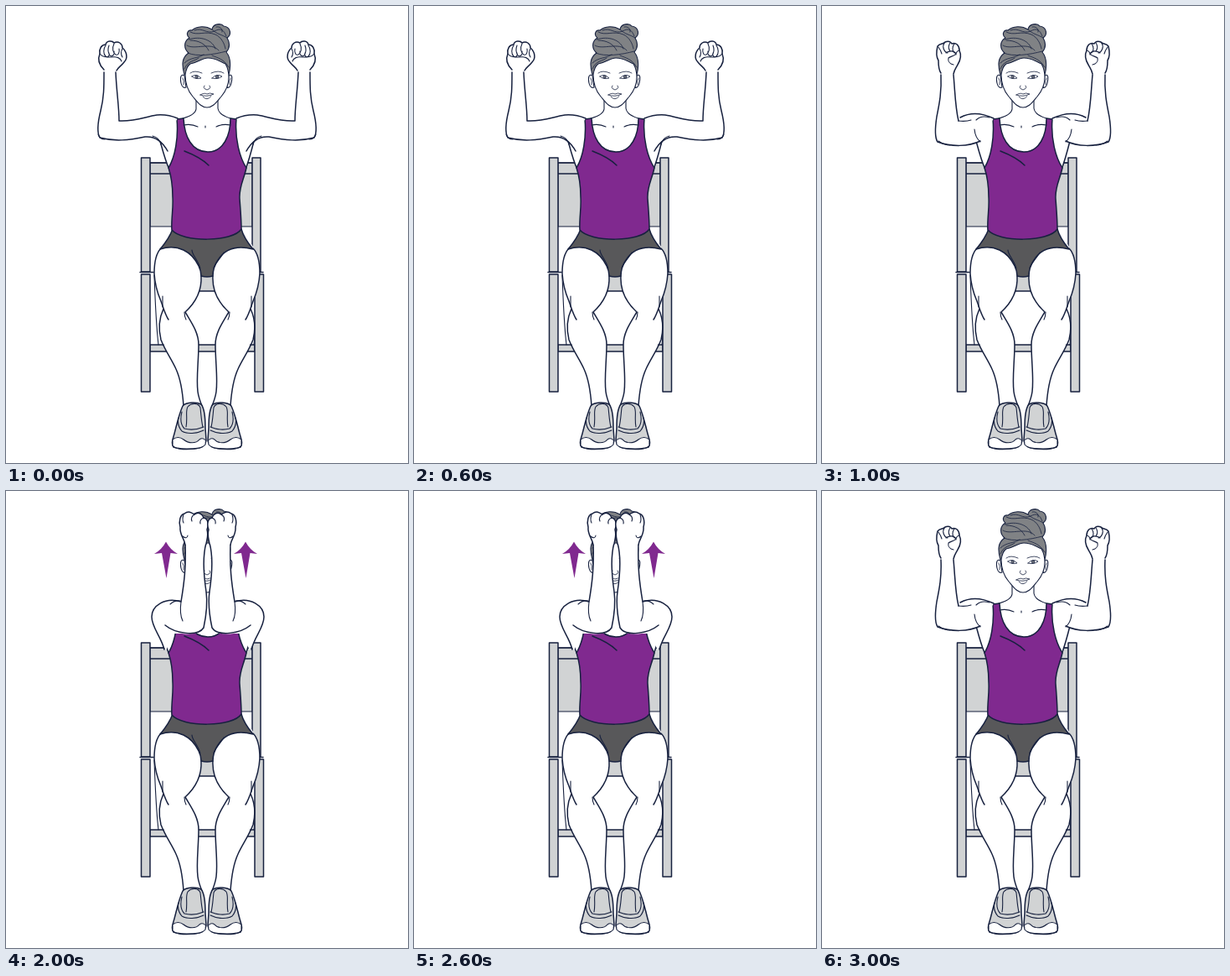
Recreate the animation shown at these times as an HTML page. Size 480 by 545 pixels, loop 4000 ms.

```html
<!DOCTYPE html>
<html lang="en">
<head>
<meta charset="utf-8">
<title>Seated arm exercise</title>
<style>
html, body { margin: 0; width: 100%; height: 100%; overflow: hidden; background: #fff; }
svg { display: block; width: 100vw; height: 100vh; }
path { stroke: #17213f; stroke-width: 1.5; stroke-linecap: round; stroke-linejoin: round; fill: none; }
.skin { fill: #fff; }
.bare { fill: #fff; stroke: none; }
.gray { fill: #d1d3d4; }
.hair { fill: #808285; }
.shorts { fill: #58585a; }
.top { fill: #80298f; }
.arrow { fill: #80298f; stroke: none; }
.fine { stroke-width: .8; }
.mid { stroke-width: 1.1; }
.pose { display: none; }
</style>
</head>
<body>
<svg viewBox="0 0 480 545">
  <!-- chair -->
  <g>
    <path class="gray mid" d="M172 187H294V263H172Z"/>
    <path d="M172 187H294M172 200H294"/>
    <path class="gray" d="M161.500 181H172V317H161.500ZM294 181H304V317H294Z"/>
    <path class="gray" d="M172 404H297V412H172Z"/>
    <path class="mid" d="M177 321C178 350 179 378 182 404M301 321C301 350 299 378 296 404"/>
    <path class="gray" d="M161.500 320H172V460H161.500ZM297 320H307.500V460H297Z"/>
    <path class="gray" d="M225 318H255V340H225Z"/>
    <path d="M160 317.500H176M302 317.500H307"/>
  </g>

  <!-- legs and shoes -->
  <g id="leg">
    <path class="bare" d="M198 270C187 282 178 294 177 317C177 336 182 345 187 358C180 380 184 398 199 426C208 442 211 460 212 480H235C227 455 231 430 230 405C230 390 221 378 214 365C226 354 234 340 233 322L240 275Z"/>
    <path d="M185 289C178 296 177 308 177 319C178 336 182 345 185 352C188 360 190 368 194 374M188 361C183 372 182 386 185 398C190 411 198 422 203 433C209 446 211 462 212 477M233 322C234 340 226 354 214 365C221 377 230 389 230 404C230 424 227 444 229 460C230 467 232 472 234 477"/>
    <path class="mid" d="M187 346V359M213 365Q213 370 215 374"/>
    <path class="gray" d="M211 477C215 472 228 472 233 475C237 480 238 491 238 503L239 518C238 525 233 527 225 528C215 529 205 528 200 526C197 522 199 517 201 510C204 499 206 488 211 477Z"/>
    <path class="skin mid" d="M199 517C204 513 208 514 212 517C218 522 227 522 231 517Q235 514 238.500 518L238 523C234 528 224 528 216 528C207 528 200 527 199 524Z"/>
    <path class="mid" d="M215 502C217 491 214 483 217 478C221 473 230 473 232 479C233 487 233 494 235 502M210 484C208 492 208 499 213 504Q224 507 236 502M210 507C216 511 228 510 236 506M206 491Q204 500 210 507"/>
  </g>
  <use href="#leg" transform="matrix(-1 0 0 1 480 0)"/>

  <!-- torso -->
  <path class="bare" d="M226 105L225 128L208 134L186 165L194 196H286L294 165L272 134L254 128L253 105Z"/>
  <path d="M184 161C187 172 190 184 195 195M296 161C293 173 290 184 286 195"/>
  <path class="shorts" d="M199 266C195 277 189 284 184 290C205 283 222 293 230 310Q233 316 233 322Q240 324 247 322Q247 312 253 303C263 287 279 286 295 290C290 284 284 277 281 266Z"/>
  <path class="mid" d="M232 313C229 302 222 297 222 291M248 312C252 303 258 299 260 294"/>
  <path class="top" d="M204 135L212 134C213 156 222 174 241 174C260 174 268 154 268 134L275 135C273 158 279 181 287 193C284 207 278 216 279 230C280 243 281 255 281 266C271 282 210 282 198 267C197 255 200 241 199 228C199 215 198 205 194 193C202 180 206 157 204 135Z"/>
  <path d="M213 173C226 178 234 182 242 190"/>

  <!-- neck and head -->
  <path class="mid" d="M227 109V123Q226 130 211 134M253 109V122Q254 130 268 134M212 142Q221 140 229 144M268 142Q259 140 251 144M238 143V145"/>
  <path class="skin mid" d="M213 83C208 80 208 87 209 92C210 97 213 98 215 97ZM266 83C271 80 270 87 269 92C268 97 265 98 264 97Z"/>
  <path class="hair mid" d="M213 82C209 68 211 61 218 56C212 51 212 42 219 38C214 34 217 28 222 29C228 24 238 23 246 28C247 21 257 20 260 24C268 25 270 34 264 38C267 43 268 49 263 55C269 62 268 74 266 82Z"/>
  <path class="skin mid" d="M214 82C215 75 217 71 220 69C230 67 234 62 241 62C251 62 257 67 262 69C265 74 266 79 266 85C266 95 262 102 257 108C251 115 247 121 240 121C233 121 229 115 223 108C217 101 214 94 214 82Z"/>
  <path class="fine" d="M217 56C228 61 248 58 263 54M216 47C225 53 245 42 254 53M218 40C233 35 247 41 250 51M220 31C229 36 238 29 250 34C257 37 261 45 262 51M225 29C235 25 239 34 249 30C256 26 260 28 263 36M246 28C252 34 258 34 264 38M251 25C255 24 259 27 258 31M213 68C220 61 228 63 236 58M213 75C217 65 225 66 230 62M266 73C260 63 253 62 246 59M220 41C230 41 238 45 242 53"/>
  <path class="fine" d="M211 86Q213 89 212 94M268 86Q266 89 267 94M220 80Q225 76 234 80M245 80Q254 76 260 80M237 95Q235 98 238 99Q240 101 242 99Q245 98 243 95"/>
  <path class="fine" d="M222 84Q227 80 233 86Q226 88 222 84ZM246 86Q252 80 258 84Q253 88 246 86Z"/>
  <path class="hair fine" d="M226.500 83h2.500v3h-2.500ZM251 83h2.500v3h-2.500Z"/>
  <path class="fine" d="M232 106Q237 103 240 105Q243 103 248 105Q240 109 232 106ZM235 108Q240 114 245 107.500"/>

  <!-- arms wide -->
  <g class="pose">
    <g id="wide">
      <path class="bare" d="M117 76L116 106L109 143L112 157Q136 163 166 156L186 162L205 134Q185 127 163 135L135 137L131 76Z"/>
      <path d="M117 79C117 97 117 109 113 125C110 137 108 150 112 157C130 162 147 160 166 156C178 155 187 162 193 173M131 79C132 103 135 119 135 137C155 138 166 132 180 130Q193 129 205 134"/>
      <path class="mid" d="M175 155Q183 157 185 165M110 153Q112 159 118 159"/>
      <path class="skin" d="M117 76C112 71 109 64 112 57C111 51 114 46 119 46C120 41 127 41 129 44C134 41 139 45 139 50C144 54 146 62 141 67C137 72 134 73 132 77"/>
      <path class="mid" d="M119 47C116 51 116 57 119 60C122 62 124 59 123 56M123 47C121 52 122 56 124 59C127 61 130 58 129 54M129 45C126 51 128 56 131 58C134 59 136 56 135 51M112 57C115 61 120 61 126 61C132 60 137 62 138 66M139 51Q136 56 139 61"/>
    </g>
    <use href="#wide" transform="matrix(-1 0 0 1 480 0)"/>
  </g>

  <!-- arms half closed -->
  <g class="pose">
    <g id="half">
      <path class="bare" d="M142 78L141 108L135 143L138 162Q161 170 188 162L205 134Q185 124 163 137L157 78Z"/>
      <path d="M142 82C143 103 140 117 137 132C135 145 134 156 138 162C154 168 175 168 189 161M157 82C159 104 159 120 163 137M165 133C176 127 190 127 205 134"/>
      <path class="mid" d="M163 137Q172 138 178 136M184 136Q190 130 200 133M182 147Q183 157 189 162M139 161Q146 166 153 166"/>
      <path class="skin" d="M142 80C139 76 139 70 139 65C136 60 137 52 138 48C141 44 145 46 147 43C151 41 154 43 155 45C160 43 164 47 164 53C167 59 165 65 162 70C160 74 158 76 157 81"/>
      <path class="mid" d="M146 44C143 49 146 55 150 56M153 44C150 48 151 51 153 54M158 45Q154 51 158 56M148 56C152 53 158 53 160 57C158 60 153 60 151 62C150 66 153 69 157 70M139 49Q142 53 143 57M164 53Q160 54 160 58"/>
    </g>
    <use href="#half" transform="matrix(-1 0 0 1 480 0)"/>
  </g>

  <!-- arms closed -->
  <g class="pose">
    <g id="shut">
      <path class="bare" d="M214 60V90L209 131C190 126 175 135 174 150C176 163 183 177 191 190L200 170L210 170Q232 173 237 161L240 130Q234 90 239 60Z"/>
      <path d="M214 62C215 91 213 108 209 132C190 126 174 137 174 150C174 163 185 173 189 189M190 160C202 170 229 174 236 163C239 149 241 135 239 120C236 100 234 80 239 62"/>
      <path class="mid" d="M209 132Q207 147 211 155M196 135Q201 130 208 131"/>
      <path class="skin" d="M214 64C213 57 207 52 208 43C206 36 208 28 213 27C218 23 222 26 225 28C230 24 235 28 236 32C242 33 242 41 240 46C242 53 240 57 239 63"/>
      <path class="mid" d="M212 28Q210 34 212 38M225 28Q220 31 222 36M236 32Q231 34 232 39M211 54Q216 58 217 53"/>
    </g>
    <use href="#shut" transform="matrix(-1 0 0 1 482 0)"/>
    <path id="up" class="arrow" d="M191 60.500Q196 70 205 75L196.500 74L191.500 104L186 74L177 75Q186 70 191 60.500Z"/>
    <use href="#up" x="95"/>
  </g>
</svg>
<script>
const poses = document.querySelectorAll('.pose');
const order = [0, 1, 2, 1];
const start = performance.now();

function draw(now) {
  const step = Math.floor(Math.max(0, now - start) / 1000) % order.length;
  poses.forEach((pose, i) => pose.style.display = i === order[step] ? 'inline' : 'none');
  requestAnimationFrame(draw);
}
draw(start);
</script>
</body>
</html>
```
